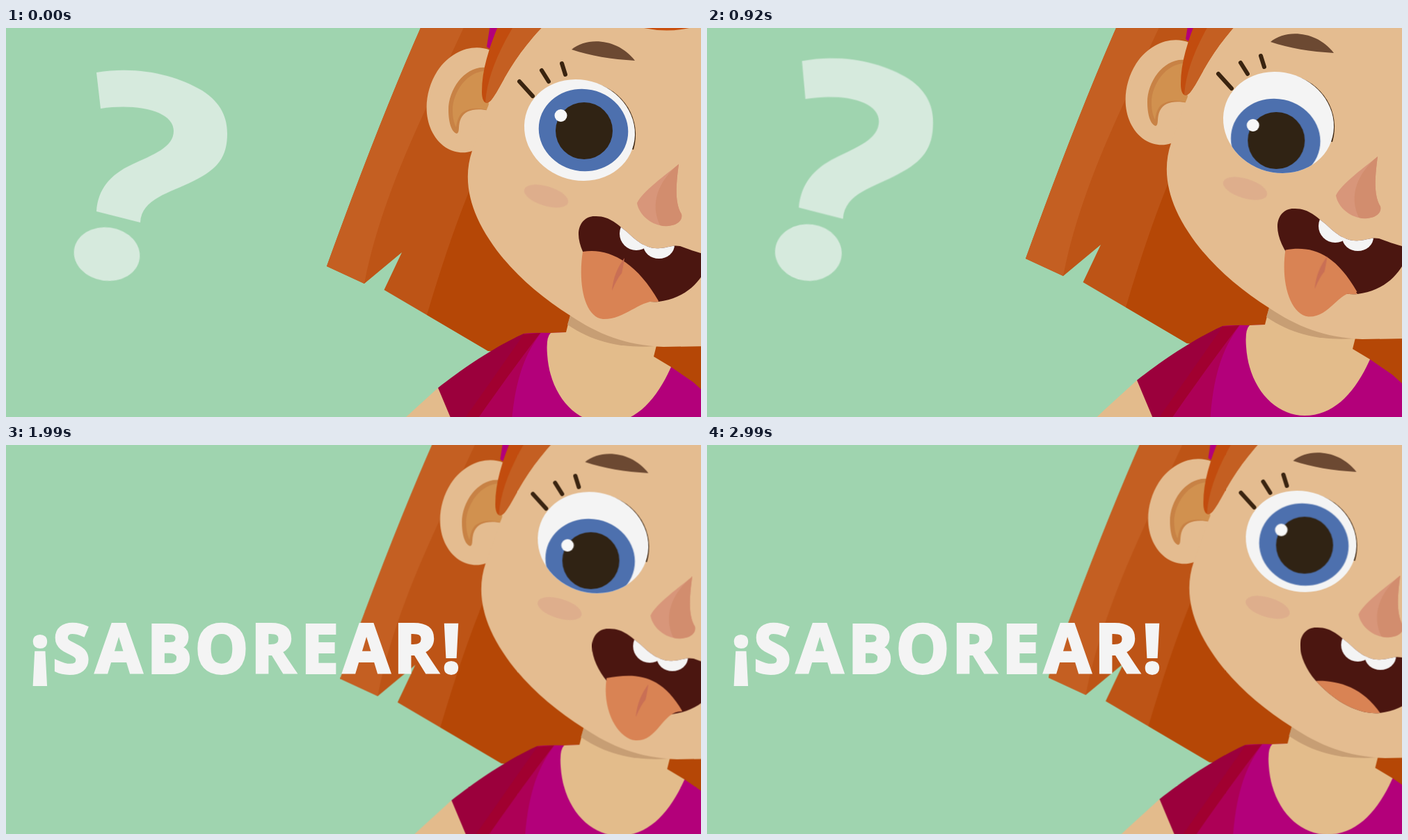
An HTML page for the animation above (3.07 s loop, 999 px wide and 560 px high).

```html
<!DOCTYPE html>
<html lang="es">
<head>
<meta charset="utf-8">
<title>¡Saborear!</title>
<style>
  html, body { margin: 0; width: 100%; height: 100%; overflow: hidden; background: #9fd4af; }
  svg { display: block; width: 100vw; height: 100vh; }
  .girl, .iris, .question, .letter { animation: 3070ms linear infinite; }
  .girl { animation-name: sway; }
  .iris { animation-name: look; }
  .question { animation-name: wobble; fill: #d6eadd; }
  .letter { animation-name: pop; }
  text {
    font: 700 96px "Open Sans", "Noto Sans", sans-serif; text-anchor: middle;
    fill: #f4f4f4; stroke: #f4f4f4; stroke-width: 4px;
  }

  @keyframes sway {
    0% { transform: translate(0, 0); }
    19.87% { transform: translate(-4px, -10px); }
    40.07% { transform: translate(-2px, -12px); }
    54.72% { transform: translate(9.5px, -8px); }
    64.82% { transform: translate(19.3px, -6.5px); }
    84.69% { transform: translate(30px, -7.2px); }
    97.39%, 100% { transform: translate(29.5px, -8.3px); }
  }
  @keyframes look {
    0%, 3% { transform: translate(0, 0); animation-timing-function: ease-in-out; }
    15%, 86% { transform: translate(-9.7px, 25px); animation-timing-function: ease-in-out; }
    97.39%, 100% { transform: translate(-1.5px, 4.5px); }
  }
  @keyframes wobble {
    0% { transform: none; opacity: 1; }
    19.87% { transform: matrix(.996, -.023, -.015, 1.085, 5.5, -28.4); }
    40.07%, 45% { transform: matrix(1.03, 0, -.03, 1.025, 7, -8.6); animation-timing-function: ease-in; }
    50.4% { transform: matrix(.01, 0, 0, .01, 208, 215); opacity: 1; }
    50.5%, 100% { transform: matrix(.01, 0, 0, .01, 208, 215); opacity: 0; }
  }
  @keyframes pop {
    0%, 50.81% { transform: scale(0); animation-timing-function: ease-in-out; }
    57.98%, 100% { transform: scale(1); }
  }
</style>
</head>
<body>
<svg viewBox="0 0 999 560" preserveAspectRatio="none">
  <defs>
    <clipPath id="eyeClip"><ellipse cx="824.5" cy="147" rx="80.5" ry="72" transform="rotate(20 824.5 147)"/></clipPath>
    <path id="mouth" d="M846 271C868 270 880 284 892 293C906 306 920 319 940 317C953 316 958 312 969 314C980 318 990 322 1010 327V338C1000 364 978 389 938 394C905 397 870 375 845 347C832 332 823 312 823 297C823 281 833 271 846 271Z"/>
    <clipPath id="mouthClip"><use href="#mouth"/></clipPath>
  </defs>
  <rect width="999" height="560" fill="#9fd4af"/>

  <g class="girl">
    <!-- hair -->
    <path fill="#bd5416" d="M598-5Q536 135 461 343L515 368L569 323L543.5 377L693 465L812 440V-5Z"/>
    <path fill="#c45f22" d="M598-5Q536 135 461 343L515 368C530 290 560 210 603 117L660-5Z"/>
    <path fill="#b54706" d="M672 220Q640 295 605 413L693 465L740 470L830 440V220Z"/>
    <path fill="#b54706" d="M925 450H1010V540L931 490Z"/>

    <!-- arm, shirt -->
    <path fill="#e3bb8c" d="M621 518L575 560L555 579H650Z"/>
    <path fill="#b3007a" d="M744 440Q765 438 783 439L810 438L956 488L988 510L1010 530V580H660Z"/>
    <path fill="#ad0056" d="M744 440L769 439C745 470 730 510 726 580H650Z"/>
    <path fill="#a10030" d="M742 441L768 439Q714 510 666 580H640Z"/>
    <path fill="#9b003c" d="M621 518C650 495 700 460 742 441L745 440L647 580Z"/>

    <!-- neck -->
    <path fill="#e3bc8b" d="M811 414L805 438L783 439Q776 445 778 470C782 530 820 569 862 569C905 569 935 535 956 488L931 473L935 457Z"/>
    <path fill="#c79e74" d="M811 414L935 440V458C890 461 848 455 807 427Z"/>

    <!-- ear, face -->
    <path fill="#e4bc90" d="M696 32C672 22 640 32 620 62C596 100 600 150 632 172C645 180 658 181 670 177L720 150V40Z"/>
    <path fill="#c88245" d="M690 57C660 54 636 88 636 118C636 135 640 150 648 152C653 150 649 140 654 130C660 118 675 115 694 119Z"/>
    <path fill="#d1914f" d="M692 62C664 60 642 92 642 118C642 130 644 137 647 143C648 136 650 126 657 121C666 115 680 114 694 119Z"/>
    <path fill="#e4bc90" d="M700 95L690 120L670 177C658 212 662 255 695 305C722 347 765 385 811 414C850 440 890 457 945 459L1010 458V-10H760Z"/>

    <!-- band, fringe -->
    <path fill="#b3007a" d="M696-5H709L695 30L691 27Z"/>
    <path fill="#c24c0e" d="M708-5C694 30 684 60 684 92C684 108 691 112 698 103C714 82 722 50 774-5Z"/>
    <path fill="#c45f22" d="M731-5C707 35 692 70 689 107C692 108 695 107 698 103C714 82 722 50 774-5Z"/>
    <path fill="#c9500f" d="M900-8L917 0Q950 7 982 0L992-8Z"/>

    <!-- eye -->
    <path fill="#6c4932" d="M813 31C835 12 880 15 904 47C870 45 840 40 813 31Z"/>
    <path fill="none" stroke="#3a2410" stroke-width="6" stroke-linecap="round" d="M738 77L757 98M770 61L780 77M799 51L804 67"/>
    <path fill="#3a2410" d="M748 142A79 77 0 1 1 902 175Z"/>
    <g clip-path="url(#eyeClip)">
      <rect x="740" y="70" width="170" height="155" fill="#f4f4f4"/>
      <g class="iris">
        <ellipse cx="830" cy="147" rx="64.5" ry="59" fill="#4d70ae" transform="rotate(12 830 147)"/>
        <circle cx="831" cy="148" r="41" fill="#302314"/>
        <circle cx="797.5" cy="126" r="9" fill="#f8f8f8"/>
      </g>
    </g>

    <!-- cheek, nose -->
    <ellipse cx="776.5" cy="242" rx="33" ry="14" fill="#deae8c" transform="rotate(17 776.5 242)"/>
    <path fill="#d8967a" d="M967 196C950 210 915 235 907 252C910 270 930 286 950 285C965 284 973 277 971 268C960 250 964 220 967 196Z"/>
    <path fill="#d28d6e" d="M967 196C938 220 925 252 940 284Q946 286 952 285C965 284 973 277 971 268C960 250 964 220 967 196Z"/>

    <!-- mouth -->
    <use href="#mouth" fill="#4b1610"/>
    <g clip-path="url(#mouthClip)">
      <path id="rest" fill="#d98354"/>
      <circle cx="906" cy="296" r="24" fill="#f4f4f4"/>
      <ellipse cx="938.5" cy="312" rx="22.5" ry="20" fill="#f4f4f4"/>
    </g>
    <g id="out">
      <path id="tongue" fill="#d98354"/>
      <path id="crease" fill="#c96f55" d="M60 9Q44 30 42 56Q49 39 56 31Q58 22 60 9Z"/>
    </g>
  </g>

  <g class="question">
    <path d="M130 64C190 54 245 68 282 90C310 108 318 130 318 152C318 185 305 203 270 220C235 238 195 245 193 280L130 264C132 232 150 211 180 197C212 182 241 172 241 148C241 120 190 108 136 116Z"/>
    <ellipse cx="145" cy="325.5" rx="47.5" ry="38.5" transform="rotate(8 145 325.5)"/>
  </g>
  <g id="word"></g>
</svg>
<script>
  const LOOP = 3070;
  const byId = id => document.getElementById(id);

  // Tongue outline from its left root, right root and tip.
  function tongue([lx, ly, rx, ry, tx, ty]) {
    return `M${lx} ${ly}C${lx + 36} ${ly - 6} ${rx - 33} ${ry - 58} ${rx} ${ry}` +
      `C${rx - 28} ${ry - 2} ${tx + 32} ${ty + 1} ${tx} ${ty}` +
      `C${tx - 27} ${ty - 3} ${lx - 7} ${ly + 45} ${lx} ${ly}Z`;
  }

  const poses = [
    [0, [829, 322, 938, 393, 858, 419]],
    [610, [834, 330, 937, 391, 868, 427]],
    [1230, [835, 331, 938, 391, 867, 426]],
    [1680, [837, 333, 941, 390, 873, 428]],
    [1990, [844, 342, 953, 390, 886, 432]],
    [2600, [830, 325, 938, 394, 864, 421]],
    [2680, [831, 326, 938, 394, 865, 418]],
    [2930, [838, 346, 942, 401, 882, 388]],
    [LOOP, [838, 346, 942, 401, 882, 388]]
  ];

  function loop(id, frames) {
    byId(id).animate(frames, { duration: LOOP, iterations: Infinity });
  }

  byId('rest').setAttribute('d', tongue([825, 350, 945, 405, 880, 430]));
  byId('tongue').setAttribute('d', tongue(poses[0][1]));
  loop('tongue', poses.map(([t, p]) => ({ offset: t / LOOP, d: `path("${tongue(p)}")` })));
  loop('crease', poses.map(([t, p]) => ({ offset: t / LOOP, transform: `translate(${p[0]}px, ${p[1]}px)` })));
  loop('out', [
    { offset: 0, opacity: 1, easing: 'step-end' },
    { offset: 2900 / LOOP, opacity: 0 },
    { offset: 1, opacity: 0 }
  ]);

  // Every letter grows around its own fixed centre.
  const centres = [49, 94, 162, 235, 310, 384, 451, 518, 589, 640];
  byId('word').innerHTML = [...'¡SABOREAR!'].map((c, i) =>
    `<g transform="translate(${centres[i]} 293.5)"><g class="letter"><text y="34">${c}</text></g></g>`).join('');
</script>
</body>
</html>
```
